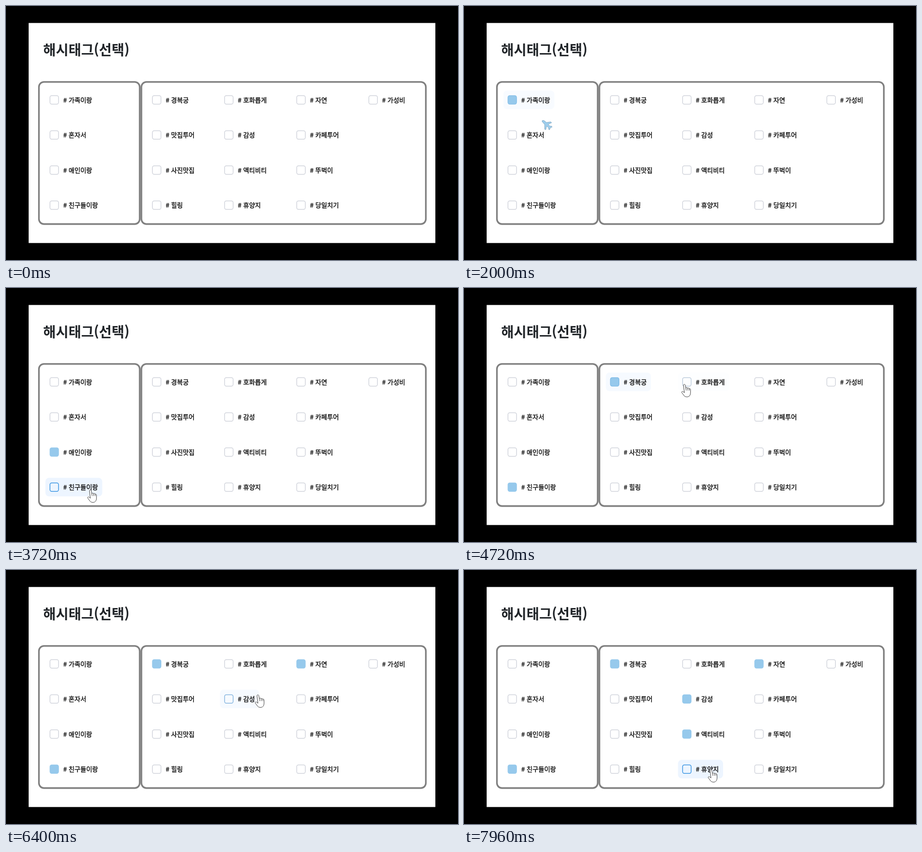
Write an HTML page that moves like this. It is 998 px wide and 561 px high and loops after 8000 ms.

```html
<!DOCTYPE html>
<html lang="ko">
<head>
<meta charset="utf-8">
<style>
  html, body { margin: 0; width: 100%; height: 100%; overflow: hidden; background: #000; }
  svg { display: block; width: 100%; height: 100%; }
  text { font-family: "Noto Sans CJK KR", "Noto Sans CJK", sans-serif; white-space: pre; }
  .title { font-size: 30.4px; font-weight: 700; fill: #212529; }
  .label { font-size: 14.1px; font-weight: 500; fill: #111; stroke: #111; stroke-width: .45; }
  .card { fill: none; stroke: #808080; stroke-width: 3.6; }
</style>
</head>
<body>
<svg viewBox="0 0 998 561">
  <rect width="998" height="561"/>
  <rect x="50" y="37.5" width="898" height="486" fill="#fff"/>
  <text class="title" x="82" y="108">해시태그(선택)</text>
  <rect class="card" x="72.7" y="167.8" width="222.5" height="313.8" rx="11"/>
  <rect class="card" x="299" y="167.8" width="628" height="313.8" rx="11"/>
  <g id="items"></g>
  <g id="plane" fill="#9dcdec" stroke="#7d9fb8" stroke-width=".8" stroke-linejoin="round">
    <path d="M0 1Q3-1 6 2L9.5 5 19 3.5 21 5.5 13.5 9 17 13 21 13 22 15 18 17 16.5 21 14.5 20.5 14 16.5 10 13 8 21 5.5 20 5.5 9.5 2 5.5Q-1 3 0 1Z"/>
  </g>
  <g id="hand" fill="#fff" stroke="#333" stroke-linejoin="round" stroke-linecap="round">
    <path d="M-1.8 1.5C-1.8-.9 1.7-1 2.1 1.5L3.4 8C4.2 6.3 7 6.6 7.3 8.5 8.2 7.2 10.6 7.7 10.9 9.5 11.8 8.6 13.7 9.3 13.8 11.2L13.8 18C13.6 24 11 27.5 6 27.5 2 27.5 0 26 -1.8 23L-5.6 17.8C-6.4 15.6 -4 14.6 -2.5 16L0 18Z"/>
    <path fill="none" d="M3.4 8L4.2 13M7.3 8.5L7.8 13M10.9 9.5L11.2 13"/>
  </g>
</svg>
<script>
const LOOP = 8000, ENTER = 680, GLIDE = 400, CLICK_HOLD = 40, FADE = 160;
const WHITE = [255, 255, 255], GLOW = [237, 245, 255], TICK = [150, 201, 236];
const columns = [
  '가족이랑 혼자서 애인이랑 친구들이랑',
  '경복궁 맛집투어 사진맛집 힐링',
  '호화롭게 감성 액티비티 휴양지',
  '자연 카페투어 뚜벅이 당일치기',
  '가성비',
].map(names => names.split(' '));

// Where the pointer rests, and when it clicks there before gliding on
const stops = [
  { at: [880, 440], click: ENTER - CLICK_HOLD },
  { at: [172, 183], click: 1280 },
  { at: [168, 214], click: 1760, item: '가족이랑' },
  { at: [177, 290], click: 2360, item: '혼자서' },
  { at: [185, 369], click: 3240, item: '애인이랑' },
  { at: [186, 446], click: 4080, item: '친구들이랑' },
  { at: [374, 213], click: 4520, item: '경복궁' },
  { at: [690, 213], click: 5920, item: '자연' },
  { at: [556, 276], click: 6720, item: '감성' },
  { at: [541, 366], click: 7440, item: '액티비티' },
  { at: [545, 441], click: LOOP, item: '휴양지' },
];

const byId = id => document.getElementById(id);
function add(tag, attrs) {
  const node = document.createElementNS('http://www.w3.org/2000/svg', tag);
  for (const key in attrs) node.setAttribute(key, attrs[key]);
  return byId('items').appendChild(node);
}
const mix = (a, b, k) => a.map((v, i) => v + (b[i] - v) * k);
const rgb = c => `rgb(${c.map(Math.round)})`;

// The first column allows one choice only, so the next click clears it
function tickedSpan(name, exclusive) {
  const i = stops.findIndex(stop => stop.item === name);
  if (i < 0) return [LOOP, LOOP];
  const next = stops[i + 1];
  const cleared = exclusive && columns[0].includes(next.item);
  return [stops[i].click, cleared ? next.click : LOOP];
}

const items = columns.flatMap((names, col) => names.map((name, row) => {
  const x = col ? 322.7 + 159.3 * (col - 1) : 96.5, cy = 207.3 + row * 77.5;
  const left = x - 9.5, width = 60.5 + 13 * name.length;
  const glow = add('rect', { x: left, y: cy - 20.5, width, height: 41, rx: 8, fill: rgb(GLOW) });
  const box = add('rect', { x: x + .6, y: cy - 9.4, width: 18.9, height: 18.9, rx: 4, 'stroke-width': 1.5 });
  add('text', { class: 'label', x: x + 30, y: cy + 5.2 }).textContent = '# ' + name;
  const contains = ([px, py]) => px > left && px < left + width && Math.abs(py - cy) < 20.5;
  return { glow, box, contains, span: tickedSpan(name, col === 0) };
}));

function pointer(t) {
  if (t < ENTER) return [-99, -99];
  const i = stops.findLastIndex(stop => stop.click + CLICK_HOLD <= t);
  const k = Math.min(1, (t - stops[i].click - CLICK_HOLD) / GLIDE);
  return mix(stops[i].at, stops[i + 1].at, k * k * (3 - 2 * k));
}

// A state averaged over the recent past behaves like a linear transition
function faded(state, t) {
  let sum = 0;
  for (let i = 0; i < 8; i++) sum += state(t - i * FADE / 8);
  return sum / 8;
}

function draw(t) {
  const tip = pointer(t);
  for (const { glow, box, contains, span: [on, off] } of items) {
    const hover = faded(s => contains(pointer(s)), t);
    const tick = faded(s => s >= on && s < off, t);
    const edge = mix([207, 210, 218], TICK, tick);
    const hoverEdge = mix([50, 145, 225], [105, 175, 225], tick);
    glow.setAttribute('opacity', hover);
    box.setAttribute('fill', rgb(mix(mix(WHITE, GLOW, hover), TICK, tick)));
    box.setAttribute('stroke', rgb(mix(edge, hoverEdge, hover)));
  }
  const overItem = items.some(item => item.contains(tip));
  for (const [id, shown] of [['hand', overItem], ['plane', !overItem]]) {
    byId(id).setAttribute('transform', `translate(${tip})`);
    byId(id).setAttribute('visibility', shown ? 'visible' : 'hidden');
  }
}

const start = performance.now();
function frame() {
  draw((performance.now() - start) % LOOP);
  requestAnimationFrame(frame);
}
frame();
</script>
</body>
</html>
```
